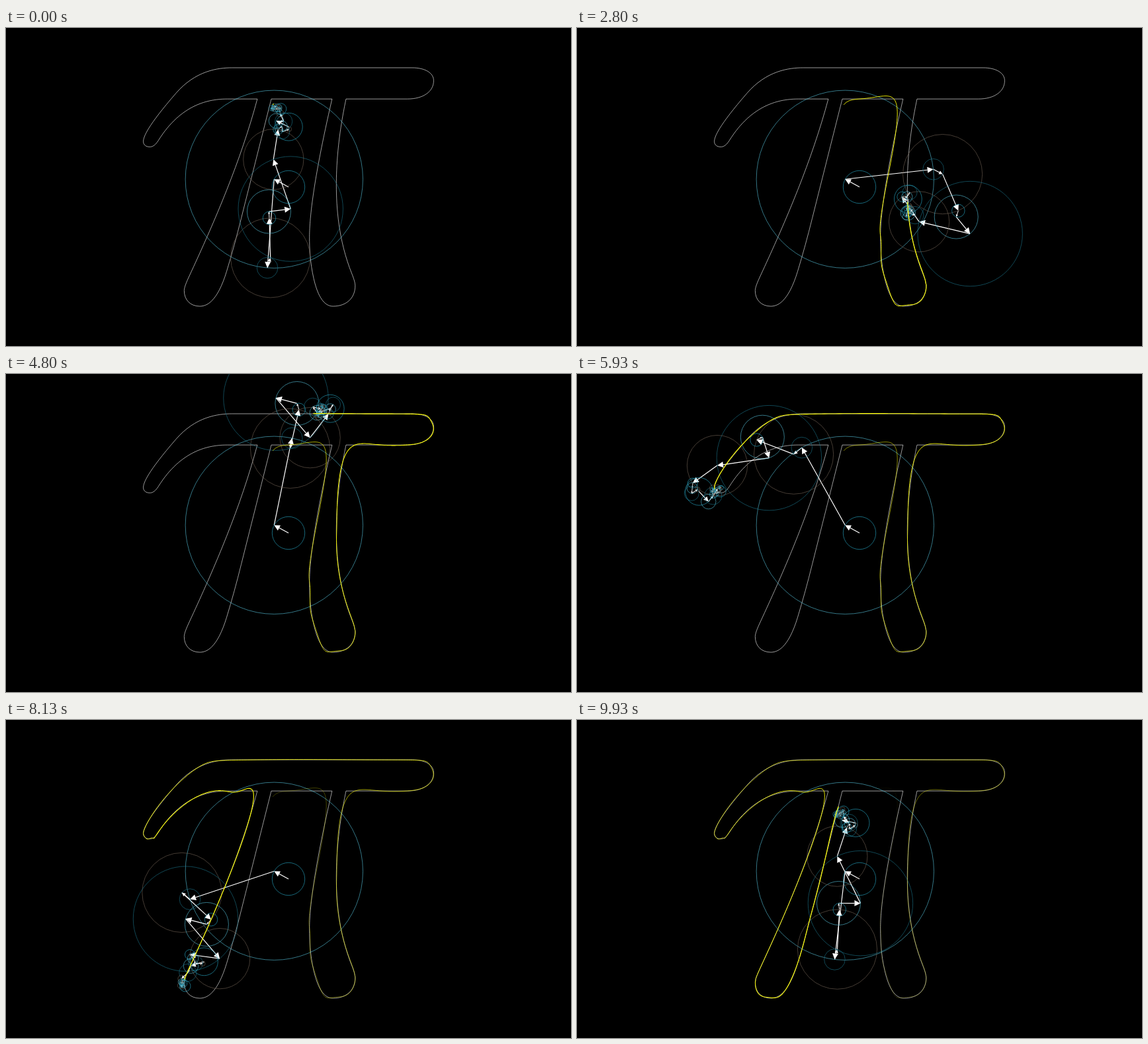
An HTML page with a canvas for the animation above (9.99 s loop, 854 by 480 pixels).

```html
<!DOCTYPE html>
<html lang="en">
<head>
<meta charset="utf-8">
<title>Fourier series of pi</title>
<style>
  html, body { margin: 0; width: 100%; height: 100%; overflow: hidden; background: #000; }
  canvas { display: block; width: 854px; height: 480px; }
</style>
</head>
<body>
<canvas id="stage" width="854" height="480"></canvas>
<script>
const ctx = document.getElementById('stage').getContext('2d');
const TAU = 2 * Math.PI;
const CENTER = [427, 240];
const UNIT = 60;                 // pixels per scene unit
const STROKE = 0.6;              // pixels per stroke-width unit
const LOOP = 9990;
const STEPS = 150;
const MAX_FREQ = 25;
const TRACE_POINTS = 1000;
const CIRCLE_COLORS = ['#29abca', '#58c4dd', '#1c758a', '#736357'];

// Outline knots in font units, y up: x, y, heading in degrees (clockwise from east).
const [E, S, W, N] = [0, 90, 180, 270];
const [TOP, EAVE, FOOT] = [432, 374, -11];
const KNOTS = [
  [265, EAVE, 284], [378, EAVE, 103],
  // right leg
  [336, 116, S], [344, 40, 77], [380, FOOT, E], [421, 27, N], [415, 49, 248], [386, 214, N],
  // bar and its hook
  [404, EAVE, 282], [518, EAVE, E], [567, 408, N], [527, TOP, W], [192, TOP, W],
  [88, 385, 131], [27, 295, S], [39, 285, E], [55, 297, 302], [183, EAVE, E],
  // left leg
  [239, EAVE, 105], [111, 42, 115], [103, 18, S], [132, FOOT, E], [182, 54, 287], [209, 152, 284]
];

const sinDeg = a => Math.sin(a * TAU / 360);
const cosDeg = a => Math.cos(a * TAU / 360);
const isSlanted = heading => heading % 90 !== 0;

// Knot position around the origin, in pixels.
function place([x, y]) {
  const scale = 360 / (TOP - FOOT);
  return [(x - 297) * scale, ((TOP + FOOT) / 2 - y) * scale];
}

function step([x, y], heading, distance) {
  return [x + distance * cosDeg(heading), y + distance * sinDeg(heading)];
}

// Share of the way from a knot to the point where both tangents meet.
function reach(own, other) {
  if (isSlanted(own)) return 0.88;
  return isSlanted(other) ? 0.42 : 0.6;
}

// Cubic between two knots; level knots are joined by a straight line.
function curveBetween(from, to) {
  const a = place(from), d = place(to);
  const [dx, dy] = [d[0] - a[0], d[1] - a[1]];
  const length = Math.hypot(dx, dy);
  const chord = Math.atan2(dy, dx) * 360 / TAU;
  const level = from[1] === to[1];
  const [h0, h1] = level ? [chord, chord] : [from[2], to[2]];
  let out = length / 3, back = length / 3;
  if (!level && !(isSlanted(h0) && isSlanted(h1))) {
    const turn = sinDeg(h1 - h0);
    out = reach(h0, h1) * length * sinDeg(h1 - chord) / turn;
    back = reach(h1, h0) * length * sinDeg(chord - h0) / turn;
  }
  return [a, step(a, h0, out), step(d, h1, -back), d];
}

function cubicAt([a, b, c, d], t) {
  const s = 1 - t;
  return [0, 1].map(i =>
    s * s * s * a[i] + 3 * s * s * t * b[i] + 3 * s * t * t * c[i] + t * t * t * d[i]);
}

// Every curve takes an equal share of the cycle.
function samplePath(curves, perCurve) {
  return curves.flatMap(curve =>
    Array.from({ length: perCurve }, (_, i) => cubicAt(curve, i / perCurve)));
}

function coefficient(samples, freq) {
  let re = 0, im = 0;
  samples.forEach(([x, y], i) => {
    const angle = TAU * freq * i / samples.length;
    const c = Math.cos(angle), s = Math.sin(angle);
    re += x * c - y * s;
    im += x * s + y * c;
  });
  re /= samples.length;
  im /= samples.length;
  return { freq, radius: Math.hypot(re, im), phase: Math.atan2(im, re) };
}

const curves = KNOTS.map((knot, i) => curveBetween(knot, KNOTS[(i + 1) % KNOTS.length]));
const samples = samplePath(curves, 300);
const freqs = [0];
for (let n = 1; n <= MAX_FREQ; n++) freqs.push(n, -n);
const terms = freqs.map(f => coefficient(samples, f));

// Joints of the vector chain at cycle position t.
function chainAt(t) {
  let [x, y] = CENTER;
  const joints = [[x, y]];
  for (const { freq, radius, phase } of terms) {
    const angle = phase - TAU * freq * t;
    x += radius * Math.cos(angle);
    y += radius * Math.sin(angle);
    joints.push([x, y]);
  }
  return joints;
}

const trace = Array.from({ length: TRACE_POINTS + 1 }, (_, i) => chainAt(i / TRACE_POINTS).pop());

const outline = new Path2D();
curves.forEach((curve, i) => {
  const [a, b, c, d] = curve.map(([x, y]) => [x + CENTER[0], y + CENTER[1]]);
  if (i === 0) outline.moveTo(...a);
  outline.bezierCurveTo(...b, ...c, ...d);
});
outline.closePath();

function drawOutline() {
  ctx.strokeStyle = '#fff';
  ctx.lineWidth = STROKE;
  ctx.stroke(outline);
}

function drawArrow([x0, y0], [x1, y1]) {
  const length = Math.hypot(x1 - x0, y1 - y0);
  const tip = Math.min(0.15 * UNIT, 0.35 * length);
  ctx.save();
  ctx.translate(x0, y0);
  ctx.rotate(Math.atan2(y1 - y0, x1 - x0));
  ctx.lineWidth = STROKE * Math.min(2, 10 * length / UNIT);
  ctx.beginPath();
  ctx.moveTo(0, 0);
  ctx.lineTo(length - tip, 0);
  ctx.stroke();
  ctx.beginPath();
  ctx.moveTo(length, 0);
  ctx.lineTo(length - tip, tip / 2);
  ctx.lineTo(length - tip, -tip / 2);
  ctx.fill();
  ctx.restore();
}

function drawVectors(joints) {
  ctx.strokeStyle = ctx.fillStyle = '#fff';
  terms.forEach((_, i) => drawArrow(joints[i], joints[i + 1]));
}

function drawCircles(joints) {
  ctx.lineWidth = STROKE;
  terms.forEach(({ radius }, i) => {
    ctx.strokeStyle = CIRCLE_COLORS[i % CIRCLE_COLORS.length];
    ctx.beginPath();
    ctx.arc(...joints[i], radius, 0, TAU);
    ctx.stroke();
  });
}

// The trail thins linearly with age.
function drawTrail(t) {
  const chunk = 8;
  const end = Math.floor(t * TRACE_POINTS) + 1;
  ctx.strokeStyle = '#ff0';
  for (let i = 0; i < end; i += chunk) {
    const last = Math.min(i + chunk, end);
    const age = t - (i + last) / 2 / TRACE_POINTS;
    ctx.lineWidth = 2 * STROKE * Math.min(1, 1 - age);
    ctx.beginPath();
    ctx.moveTo(...trace[i]);
    for (let j = i + 1; j <= last; j++) ctx.lineTo(...trace[j]);
    ctx.stroke();
  }
}

// Fifteen steps a second, each starting on a multiple of 10 ms.
function stepAt(ms) {
  const next = Math.ceil(ms * 0.015);
  return Math.round(next * 20 / 3) * 10 > ms ? next - 1 : next;
}

function draw(ms) {
  const t = stepAt(ms) / STEPS;
  const joints = chainAt(t);
  ctx.fillStyle = '#000';
  ctx.fillRect(0, 0, 854, 480);
  drawOutline();
  drawVectors(joints);
  drawCircles(joints);
  drawTrail(t);
}

const start = performance.now();
function tick() {
  draw((performance.now() - start) % LOOP);
  requestAnimationFrame(tick);
}
tick();
</script>
</body>
</html>
```
